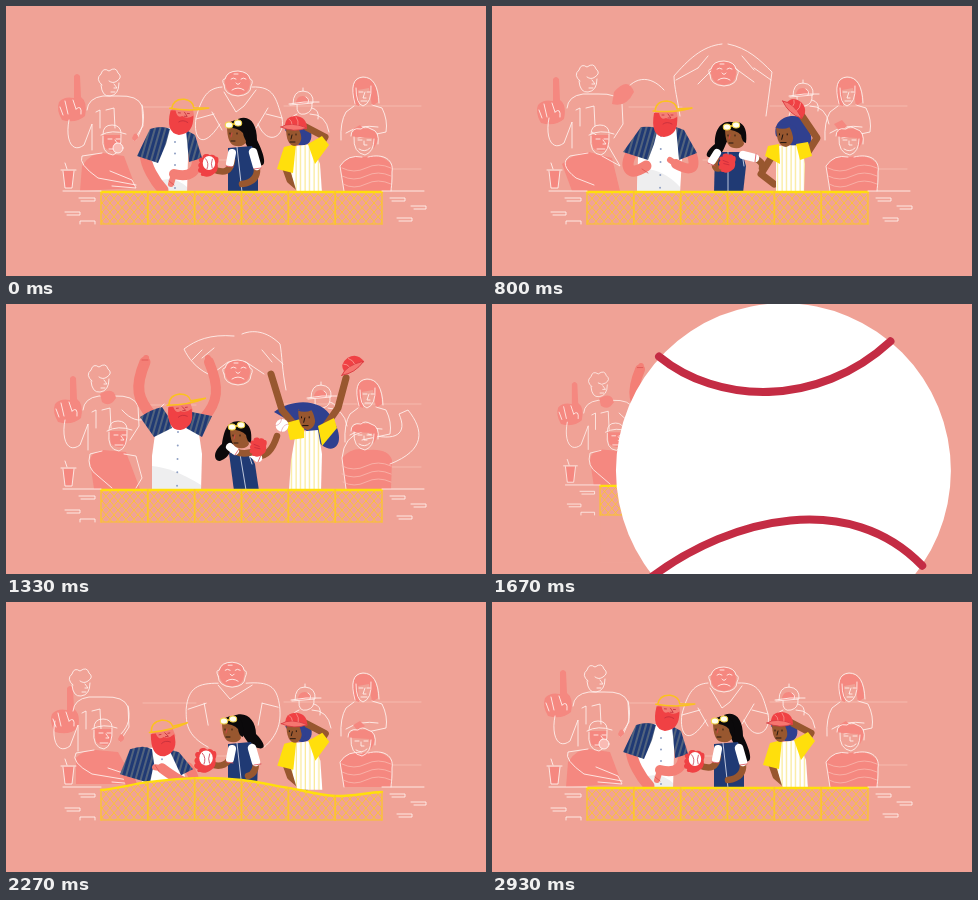
Recreate the animation shown at these times as an HTML page. Size 480 px wide and 270 px high, loop 2990 ms.

```html
<!DOCTYPE html>
<html lang="en">
<head>
<meta charset="utf-8">
<title>Ballpark catch</title>
<style>
html, body { margin: 0; width: 100%; height: 100%; overflow: hidden; background: #f0a296; }
svg { display: block; width: 100vw; height: 100vh; }
</style>
</head>
<body>
<svg id="stage" viewBox="0 0 480 270" stroke-linecap="round" stroke-linejoin="round">
  <defs>
    <pattern id="pin" width="5" height="5" patternUnits="userSpaceOnUse" patternTransform="rotate(16)">
      <path d="M0 0H5V5H0Z" fill="#203a74"/><path d="M2 0V5" stroke="#c9c394" stroke-width=".6"/>
    </pattern>
    <pattern id="stripe" width="4.5" height="5" patternUnits="userSpaceOnUse">
      <path d="M0 0H5V5H0Z" fill="#fff"/><path d="M2 0V5" stroke="#f5dc55" stroke-width=".8"/>
    </pattern>
    <clipPath id="fenceClip"><path id="clipShape"/></clipPath>
  </defs>
</svg>
<script>
const LOOP = 2990, STEP = 1000 / 15, FRAMES = 45;
const BG = '#f0a296', PINK = '#f58880', SKIN = '#f47f76', RED = '#f04144', NAVY = '#203a74',
  BROWN = '#98572f', BLACK = '#0b090b', YELLOW = '#ffdf0c', GOLD = '#fcc62d', BLUE = '#30408f', WHITE = '#fff';
const svg = document.getElementById('stage');
const NUM = /-?\d*\.?\d+/g;
const morphs = [];

const clamp = v => Math.max(0, Math.min(1, v));
const smooth = k => k * k * (3 - 2 * k);
const mix = (a, b, k) => {
  if (a === b) return a;
  const to = b.match(NUM);
  let i = 0;
  return a.replace(NUM, v => +(+v + (to[i++] - v) * k).toFixed(3));
};
function track(t, keys, ease = smooth) {
  let i = 0;
  while (i < keys.length - 2 && t >= keys[i + 1][0]) i++;
  const [t0, a] = keys[i], [t1, b] = keys[i + 1];
  return mix(a, b, ease(clamp((t - t0) / (t1 - t0))));
}

function add(parent, tag, attrs = {}) {
  const node = document.createElementNS('http://www.w3.org/2000/svg', tag);
  for (const name in attrs) node.setAttribute(name, attrs[name]);
  return parent.appendChild(node);
}
// poses: rest, look up, cheer, settle
function pose(node, attr, [rest, look = rest, cheer = look, settle = rest]) {
  node.setAttribute(attr, rest);
  if (look !== rest || cheer !== rest || settle !== rest)
    morphs.push({ node, attr, poses: [rest, look, cheer, settle] });
  return node;
}
const group = (parent, ...poses) => poses.length ? pose(add(parent, 'g'), 'transform', poses) : add(parent, 'g');
const fill = (parent, color, ...poses) => pose(add(parent, 'path', { fill: color }), 'd', poses);
const line = (parent, color, width, ...poses) =>
  pose(add(parent, 'path', { fill: 'none', stroke: color, 'stroke-width': width, pathLength: 1 }), 'd', poses);
const chalk = (parent, ...poses) => line(parent, '#fff4f0', .85, ...poses);
const oval = (parent, color, cx, cy, rx, ry = rx, extra = {}) =>
  add(parent, 'ellipse', { fill: color, cx, cy, rx, ry, ...extra });
const show = (node, on) => node.setAttribute('visibility', on ? 'visible' : 'hidden');

const world = group(svg);

// Seats and the chalk crowd
const seats = group(world);
line(seats, '#f8cbc0', .6, 'M137 101H190M278 100H415M385 163H415M211 154H222');

const mid = group(world);
chalk(mid, 'M216 81C202 82 196 90 190 112C187 132 196 146 214 118',
  'M188 110C186 96 182 80 182 70C196 54 210 40 230 38',
  'M202 70C190 64 182 54 178 45C190 36 204 30 228 32',
  'M210 80C190 80 180 84 178 106C178 120 178 132 200 144');
chalk(mid, 'M246 81C268 80 270 92 276 112C280 130 262 142 252 118',
  'M274 110C276 96 278 80 280 66C268 54 256 42 236 38',
  'M280 86C276 66 276 50 274 40C264 30 250 24 236 30',
  'M238 80C262 78 268 84 271 100C274 118 270 132 256 144');
chalk(mid, 'M218 86L230 106L238 100L250 84M206 106L216 124M262 102L250 122M190 113L208 108M276 112L260 108',
  'M206 78L224 60L240 60L262 76M206 62L216 50M262 64L250 50M184 74L206 62M279 74L262 62',
  'M206 70L222 58L240 58L258 70M196 54L208 44M266 58L256 46M186 56L196 46M277 60L266 50',
  'M210 82L222 96L228 92L244 82M196 100L200 122M254 100L250 122M180 106L198 100M270 104L254 100');
const midHead = group(mid, 'translate(231 78)', 'translate(231 68)', 'translate(231 69)', 'translate(223 72)');
fill(midHead, PINK, 'M-12 -3Q-10 -13 1 -13Q12 -12 13 -2Q13 10 1 11Q-12 10 -12 -3Z');
chalk(midHead, 'M-13 1Q-16 -5 -12 -5Q-10 -13 1 -13Q12 -12 13 -5Q17 -4 14 2Q14 11 1 12Q-13 11 -13 1M-6 -5Q-4 -7 -1 -5M4 -5Q6 -7 9 -5M-1 -1Q1 2 3 -1M-5 6Q1 2 7 6M-3 -10H1');

const finger = group(world, 'translate(0 0)', 'translate(-7 3)', 'translate(-4 4)', 'translate(-7 16)');
fill(finger, PINK, 'M68 92L68 70Q71 66 74 70L75 91Q82 96 79 110Q70 118 56 114Q50 104 53 96Q58 90 68 92Z');
chalk(finger, 'M59 95L62 108M67 94L70 103M54 101L57 109M70 103Q76 98 75 108');
const fan = group(world, 'translate(0 0)', 'translate(-6 -2)', 'translate(-4 2)', 'translate(-14 5)');
chalk(fan, 'M63 114C59 134 66 148 78 139L86 118V144M81 104Q82 92 97 90L112 90Q132 89 136 100L137 120L128 134M100 104L108 102L109 122M90 106L94 104V122');
chalk(fan, 'M136 99C139 112 138 120 130 134', 'M136 92C146 72 164 70 178 86', 'M120 104C138 124 150 110 162 98', 'M136 99C139 112 136 120 128 128');
const fanHead = group(fan, 'translate(103 76)', 'translate(101 74)', 'translate(97 72)', 'translate(88 75)');
chalk(fanHead, 'M-8 3Q-7 15 1 14Q10 13 10 1M-7 3Q-14 -3 -8 -8Q-6 -15 0 -11Q7 -16 9 -9Q14 -5 8 -1Q4 2 0 -1M5 2L8 6H5M2 10H6');
fill(fan, PINK, 'M128 128Q132 126 132 132Q128 138 126 132Z', 'M128 88Q142 72 148 88Q140 104 126 100Z', 'M98 88Q112 80 114 92Q108 102 100 96Z', 'M128 128Q132 126 132 132Q128 138 126 132Z');

const gum = group(world);
fill(gum, PINK, 'M74 185L76 160Q84 147 97 147L118 150L130 182Z', 'M80 185L70 158Q84 146 97 146L120 152L128 185Z', 'M88 185L84 158Q84 148 97 146L120 148L134 185Z', 'M70 182L70 156Q78 147 90 148L112 150L130 182Z');
chalk(gum, 'M96 147L76 150Q72 158 92 172L130 179M104 165L126 174L130 182L106 180',
  'M96 147L78 150Q66 158 84 172L102 179M110 150L128 160L114 136L100 126',
  'M96 147L84 150Q80 164 92 172L106 184M118 150L130 152L136 174L130 184',
  'M88 148L70 151Q64 160 86 172L128 179M102 166L126 174L130 182L106 180');
const gumHead = group(gum, 'translate(106 134)', 'translate(108 134)', 'translate(112 132)', 'translate(97 132)');
fill(gumHead, PINK, 'M-9 -5H9L8 9Q0 14 -7 8Z');
chalk(gumHead, 'M-9 -4Q-11 14 1 15Q10 12 9 -6M-11 -5Q0 -11 14 -6M-9 -6Q-9 -15 0 -15Q8 -15 9 -8M-4 -1H0M4 -1H8M3 0L6 4H3M-3 9H5');
const bubble = oval(gumHead, '#f9bab3', 6, 8, 5, 5, { stroke: WHITE, 'stroke-width': .8 });

const capFan = group(world, 'translate(0 0)', 'translate(14 -8)', 'translate(18 -4)', 'translate(2 0)');
fill(capFan, PINK, 'M290 98Q290 90 297 90Q304 91 304 98Z');
chalk(capFan, 'M287 98Q287 85 297 85Q308 86 307 97L284 99M283 98Q298 95 313 96M297 85V82M291 99Q290 110 299 108Q307 106 306 97M300 91Q304 93 302 97M306 102Q314 104 312 113M291 108Q282 111 283 122M304 108Q320 108 323 126');

const hairFan = group(world, 'translate(0 0)', 'translate(-2 0)', 'translate(4 4)', 'translate(0 0)');
fill(hairFan, PINK, 'M348 98Q343 72 357 72Q371 71 372 96L366 100L363 82L352 84L353 100Z');
chalk(hairFan, 'M350 82Q350 98 357 100Q366 97 365 80M353 86H357M361 86H364M359 86L357 92H360M355 95H361M348 100L340 106Q334 116 335 134M366 99L376 102Q382 114 380 126L352 132M340 127Q354 118 372 121M349 98Q342 72 357 71Q372 71 373 97');
fill(hairFan, PINK, 'M347 123L354 119L359 124L352 129Z', 'M344 118L352 114L357 120L350 126Z');

const stripeFan = group(world);
fill(stripeFan, PINK, 'M338 185L334 160Q342 148 358 151Q378 147 386 160L385 185Z', 'M338 185L334 160Q342 148 358 151Q378 147 386 160L385 185Z', 'M340 185L336 154Q346 142 362 146Q382 144 386 156L385 185Z');
chalk(stripeFan, 'M338 185L334 160Q342 148 356 151M362 151C378 147 388 154 386 166L386 172C386 178 385 182 385 185',
  'M338 185L334 160Q342 148 356 151M362 151C378 147 388 154 386 166L386 172C386 178 385 182 385 185',
  'M340 185L336 154Q338 132 356 128M362 130C390 138 402 130 393 110L402 106C418 126 420 146 384 160');
line(stripeFan, '#fac0b6', .7, 'M336 162Q348 168 360 162T385 162M336 170Q348 176 360 170T385 170M337 178Q348 184 360 178T385 178');
const stripeHead = group(stripeFan, 'translate(357 134)', 'translate(356 134)', 'translate(357 131)', 'translate(354 139)');
fill(stripeHead, PINK, 'M-12 -4Q-10 -12 0 -11Q14 -14 15 0L11 8L9 -2L-8 -3Z');
chalk(stripeHead, 'M-9 -3Q-10 13 2 15Q11 12 11 -1M-12 -4Q-12 -13 -2 -11Q2 -15 8 -11Q17 -9 15 4M-5 0H-1M4 0H8M1 1V5H4M-4 9Q2 13 7 8');

const cup = group(world);
fill(cup, PINK, 'M57 165H68L66 182H59Z');
chalk(cup, 'M55 164H70M57 165L59 182H66L68 165M61 163L59 157');

// Bearded man
const man = group(world);
fill(man, WHITE, 'M148 124Q165 120 182 124L182 152L181 187L160 187L141 160Z',
  'M149 123Q168 119 186 123L190 152L188 187L145 187L146 152Z',
  'M150 123Q172 118 192 123L196 150L195 187L146 187L146 152Z',
  'M134 124Q150 120 166 125L178 147L188 194L152 194L135 154Z');
fill(man, '#eeeeef', 'M160 187L152 176Q166 168 181 181V187Z', 'M145 187L146 164Q168 160 188 181V187Z', 'M146 187L146 162Q168 164 195 181V187Z', 'M152 194L146 178Q164 172 186 186V194Z');
line(man, '#8fa0c4', 2, 'M169 136L169 184', 'M169 130L168 184', 'M172 128L171 184', 'M156 134L172 184').setAttribute('stroke-dasharray', '0 .24');
line(man, SKIN, 11, 'M139 148C140 160 148 174 157 184', 'M140 146C132 160 136 172 154 160', 'M146 112C132 96 128 84 139 58', 'M122 146C124 164 136 180 150 188');
line(man, SKIN, 10, 'M190 147C194 166 184 172 168 168', 'M199 146C206 164 198 166 184 158', 'M198 114C212 98 214 84 203 58', 'M182 142C196 162 184 164 156 143');
fill(man, 'url(#pin)', 'M144 123Q156 119 164 123L160 138L152 157L131 150Z', 'M149 121Q158 120 166 122L162 138L156 154L131 146Z', 'M134 113Q146 105 156 103L162 112L166 124L148 133Z', 'M124 124Q138 119 146 124L148 138L144 158L114 149Z');
fill(man, 'url(#pin)', 'M180 124L189 129L196 152L183 156Z', 'M184 121L192 124L205 147L187 154Z', 'M186 108L206 112L196 133L180 124Z', 'M163 124L173 127L187 144L175 150Z');
line(man, SKIN, 6, 'M168 168L165 178', 'M154 160L149 165', 'M139 58L140 54', 'M156 143L149 142');
line(man, SKIN, 6, 'M155 184L159 186', 'M184 158L178 154', 'M203 58L202 54', 'M149 187L153 189');
line(man, '#d94c4c', .7, 'M163 175L168 179', 'M150 163L156 167', 'M136 56L142 56', 'M149 140L153 146');
const manHead = group(man, 'translate(175 113) rotate(4)', 'translate(173 115) rotate(0)', 'translate(174 110) rotate(-6)', 'translate(157 115) rotate(-10)');
fill(manHead, SKIN, 'M-10 -12H11L13 -3L11 4H-10Z');
fill(manHead, RED, 'M-11 -8Q-15 15 -1 16Q14 14 12 -4Q6 0 1 -3Q-4 0 -6 -8Z');
line(manHead, '#c32f3b', .8, 'M-2 3Q2 0 7 3M-3 -6H-1M6 -6H8M3 -7L6 -3H3');
add(manHead, 'path', { d: 'M-10 -10Q-9 -20 2 -20Q11 -19 12 -12L27 -13Q10 -8 -12 -10Z', fill: BG, stroke: '#fbc21e', 'stroke-width': 1.5 });

// Woman with the cap
const woman = group(world);
fill(woman, BLUE, 'M279 124C284 114 301 116 305 126C307 136 301 142 290 138Z',
  'M284 130C278 106 318 102 318 126C324 144 308 144 296 138Z',
  'M268 108C286 94 316 94 326 114C344 142 324 158 306 130Z');
line(woman, BROWN, 7, 'M279 160L284 174L298 186', 'M279 152L269 168L282 178', 'M291 124L276 106L265 70');
const raisedArm = line(woman, BROWN, 7, 'M312 142L319 131L298 120', 'M316 146L325 132L308 107', 'M318 124L332 104L340 74');
fill(woman, 'url(#stripe)', 'M284 141L306 138L314 158L316 187L291 187L283 160Z', 'M284 140L310 139L313 158L312 187L284 187L284 160Z', 'M290 128L312 126L316 150L315 187L283 187L285 156Z');
fill(woman, YELLOW, 'M278 141L290 138L287 167L271 163Z', 'M276 140L287 138L288 158L273 150Z', 'M280 119L298 114L298 134L284 136Z');
fill(woman, YELLOW, 'M302 138L316 130L323 139L309 158Z', 'M304 138L316 136L320 150L308 154Z', 'M312 122L328 114L331 124L316 142Z');
const womanHead = group(woman, 'translate(288 130) scale(1)', 'translate(293 130) scale(1.1)', 'translate(301 115) scale(1.1)');
fill(womanHead, BROWN, 'M-8 -9H7Q10 8 1 10Q-8 10 -8 -9Z');
line(womanHead, BLACK, .8, 'M-5 -2V-1M2 -2V-1M-2 -1L-3 3M-4 6H1');
fill(womanHead, BLUE, 'M-9 -8Q0 -14 10 -8Q13 6 8 6Q7 -4 4 -8Q-2 -5 -9 -8Z');
const cap = group(woman, 'translate(289 117) rotate(0)', 'translate(304 101) rotate(40)', 'translate(345 60) rotate(-35)');
fill(cap, RED, 'M-10 3Q-10 -7 1 -7Q12 -6 12 6Z');
add(cap, 'path', { d: 'M-14 4Q-5 -2 12 5Q-2 10 -14 4Z', fill: '#f67670', stroke: '#d93940', 'stroke-width': .8 });
line(cap, '#ffb3a8', .6, 'M1 -6Q4 -2 3 2M-6 -4Q-3 -2 -3 1');

// Girl with the glove
const MITT = 'M-33 -6C-46 -22 -30 -30 -22 -26C-26 -44 0 -46 8 -36C20 -42 30 -34 32 -30C46 -34 46 -12 40 0C44 20 36 36 26 40C10 54 -8 56 -18 50C-30 52 -32 44 -28 38C-42 38 -46 22 -36 16C-44 8 -40 -2 -33 -6Z';
function goggles(parent, x1, y1, x2, y2, r) {
  line(parent, GOLD, r * .4, `M${x1} ${y1}L${x2} ${y2}`);
  for (const [x, y] of [[x1, y1], [x2, y2]])
    oval(parent, '#fffdf0', x, y, r * 1.1, r * .9, { stroke: '#f3d544', 'stroke-width': r * .3 });
}
const girl = group(world);
fill(girl, BLACK, 'M232 113C244 108 251 118 251 134C258 148 262 162 253 159C247 152 243 144 238 134Z',
  'M246 118C230 110 222 124 223 138C213 146 210 154 226 151C232 146 232 140 238 130Z',
  'M240 119C222 112 218 126 216 140C204 150 210 160 216 156C226 152 224 142 232 134Z',
  'M227 114C240 108 250 118 250 132C260 142 260 148 252 146C243 144 242 140 236 132Z');
fill(girl, NAVY, 'M222 142L246 140L252 160L252 187L222 187Z', 'M223 146L250 146L254 160L251 187L222 187Z', 'M223 149L242 146L249 160L253 187L228 187Z', 'M222 142L245 140L252 160L251 187L222 187Z');
line(girl, '#e6eaf5', .8, 'M231 141L236 186M246 142L250 160', 'M236 146L236 186M250 147L252 160', 'M234 150L240 186M242 148L246 160');
line(girl, BROWN, 6.5, 'M251 162Q252 176 236 178', 'M262 152Q272 156 270 162', 'M250 152Q264 154 271 132', 'M250 160Q250 172 242 174');
line(girl, WHITE, 8.5, 'M247 146L251 160', 'M251 149L263 152', 'M247 150L252 154', 'M246 146L250 160');
line(girl, BROWN, 6.5, 'M226 154Q224 171 207 163', 'M224 152Q219 168 234 160', 'M224 143Q234 154 252 146', 'M225 152Q222 168 203 162');
line(girl, WHITE, 8, 'M226 147L224 157', 'M225 147L220 155', 'M224 143L229 147');
line(girl, '#d94a55', .8, 'M220 160L227 161M248 163L255 162', 'M216 157L223 160M264 148L263 156', 'M229 151L233 145M252 158L255 151');
const girlHead = group(girl, 'translate(230 130)', 'translate(242 132)', 'translate(233 134)', 'translate(225 130)');
fill(girlHead, BROWN, 'M-9 -10H7L10 6Q8 11 0 10Q-9 9 -9 -10Z');
fill(girlHead, BLACK, 'M-10 -9Q-6 -17 4 -16Q14 -13 12 5Q8 4 7 -3Q3 -8 -10 -9Z');
line(girlHead, BLACK, .8, 'M-6 -3V-2M1 -3V-2M-5 5H-1');
line(girlHead, '#d9454a', .8, 'M-4 -3L-5 1');
goggles(girlHead, -7, -11, 2, -13, 3.4);
const mitt = group(girl, 'translate(202 158) scale(.24)', 'translate(235 156) scale(.2)', 'translate(252 142) scale(.2)', 'translate(199 157) scale(.26)');
fill(mitt, RED, MITT);
line(mitt, '#b92338', 3, 'M-20 -8L6 2M-16 8L10 14');
const heldBall = group(mitt);
oval(heldBall, WHITE, 4, -4, 26, 29);
line(heldBall, '#c42c44', 3, 'M-10 -22Q6 -4 -4 20M18 -20Q10 0 17 16');

// The leap
const leap = group(world);
line(leap, BROWN, 22, 'M148 104L190 140');
line(leap, BROWN, 9, 'M255 148L262 164');
fill(leap, BLACK, 'M178 108C180 84 218 84 228 96C240 114 262 128 259 144C250 150 240 140 230 136Z');
fill(leap, WHITE, 'M182 121L172 138L200 160L204 142Z');
fill(leap, WHITE, 'M234 142Q252 138 260 151L244 165Z');
line(leap, '#d94a55', 1.2, 'M186 125L176 139M259 155L246 164');
fill(leap, NAVY, 'M195 148Q220 140 236 143L252 166L244 186H213Q200 174 195 148Z');
line(leap, '#dfe5f2', .9, 'M213 151L225 182M217 150L229 180');
fill(leap, BROWN, 'M183 118Q200 106 226 104Q232 112 234 119Q242 119 239 128Q234 130 231 127Q230 150 212 154Q196 154 190 138Z');
fill(leap, BLACK, 'M178 112Q186 92 210 95Q228 96 232 118Q222 108 184 118Z');
line(leap, BLACK, 2, 'M192 125V126M218 124V125');
line(leap, BLACK, 1.1, 'M204 139Q210 136 215 140M188 120L194 119M214 118L221 119');
line(leap, '#d9454a', 1.2, 'M204 122L202 133L206 134');
goggles(leap, 189, 108, 213, 106, 9.5);
add(leap, 'path', { d: MITT, fill: RED, transform: 'translate(115 79)' });

// Fence and walls
const cover = fill(world, BG, 'M0 0');
const mesh = add(world, 'g', { 'clip-path': 'url(#fenceClip)' });
const hatch = slope => {
  let d = '';
  for (let x = 20; x < 460; x += 8) d += `M${x} 220L${x + slope} 160`;
  return d;
};
line(mesh, GOLD, .9, hatch(52));
const crossHatch = line(mesh, GOLD, .9, hatch(-52));
const rail = line(world, YELLOW, 2.4, 'M0 0');
const posts = Array.from({ length: 7 }, (_, i) => line(world, GOLD, i % 6 ? 1.8 : 1.3, 'M0 0'));
const baseRail = line(world, GOLD, 1.2, 'M95 218H376');
const walls = group(world);
chalk(walls, 'M57 185H95M376 185H418M73 192H89V195H75M59 206H74V209H61M74 218V215H89V218M384 192H399V195H386M405 200H420V203H408M391 212H406V215H393');

// Ball in units of its radius
const ball = group(svg);
oval(ball, WHITE, 0, 0, 1);
line(ball, '#c42c44', .048, 'M-.744 -.68C-.4 -.4 .2 -.37 .637 -.774M-.79 .64C-.3 .27 .4 .12 .83 .565');

const POSES = [[0, 0], [250, 0], [720, 1], [900, 1], [1220, 2], [1700, 2], [1701, 3], [2550, 3], [2930, 0]];
const FLAT = '186 186 186 186 186 186 186';
const RAIL = [[0, FLAT], [1700, FLAT], [1701, '218 205 190 173 163 162 174'], [2000, '218 205 190 174 162 162 174'],
  [2250, '188 180 176 178 186 194 190'], [2530, '192 196 191 180 177 186 192'],
  [2730, '185 183 185 188 189 187 185'], [2930, FLAT]];
const BALL = [[1200, '262 60 1 -60'], [1330, '276 121 6 -45'], [1530, '280 140 32 -20'], [1600, '285 155 82 -10'],
  [1666, '292 167 168 0'], [1735, '232 136 112 14'], [1800, '166 103 66 28'], [1870, '124 84 40 36'],
  [2000, '115 79 30 41'], [2200, '187 110 13.5 60']];
const LEAP_END = [[2000, 'translate(0 0) scale(1)'], [2200, 'translate(135 75) scale(.45)']];

function drawFence(t, away) {
  const y = track(t, RAIL).split(' ').map(Number);
  const x = i => 95 + i * 281 / 6;
  const at = i => y[Math.max(0, Math.min(6, i))];
  let d = `M376 ${y[6]}`;
  for (let i = 6; i > 0; i--)
    d += `C${x(i) - 15.6} ${at(i) + (at(i - 1) - at(i + 1)) / 6} ${x(i - 1) + 15.6} ${at(i - 1) - (at(i - 2) - at(i)) / 6} ${x(i - 1)} ${y[i - 1]}`;
  rail.setAttribute('d', d);
  cover.setAttribute('d', d + 'V270H376Z');
  document.getElementById('clipShape').setAttribute('d', d + 'V218H376Z');
  posts.forEach((post, i) => {
    post.setAttribute('d', `M${x(i)} ${y[i]}V${i === 5 && away ? 204 : 218}`);
    show(post, !away || i === 5);
  });
  rail.setAttribute('stroke-dasharray', away ? '.62 2' : 'none');
  show(crossHatch, !away);
  baseRail.setAttribute('stroke', away ? WHITE : GOLD);
  baseRail.setAttribute('d', away ? 'M217 218H255' : 'M95 218H376');
}

function reveal(node, t, start, end) {
  const p = t < 1710 ? 1 : clamp((t - start) / (end - start));
  show(node, p > 0);
  node.setAttribute('stroke-dasharray', p < 1 ? `${p} 2` : 'none');
  node.setAttribute('opacity', Math.min(1, p * 1.5));
}

function draw(t) {
  const away = t > 1710 && t < 2190;
  let i = 0;
  while (i < POSES.length - 2 && t >= POSES[i + 1][0]) i++;
  const [t0, a] = POSES[i], [t1, b] = POSES[i + 1];
  const k = smooth(clamp((t - t0) / (t1 - t0)));
  for (const m of morphs) m.node.setAttribute(m.attr, mix(m.poses[a], m.poses[b], k));

  const zoom = t < 1710 ? 1 - .09 * smooth(clamp((t - 1470) / 190)) : 1;
  world.setAttribute('transform', `translate(${240 * (1 - zoom)} ${140 * (1 - zoom)}) scale(${zoom})`);

  for (const node of [mid, hairFan]) reveal(node, t, 1850, 1990);
  for (const node of [fan, finger, gum, capFan, stripeFan, cup, walls, seats]) reveal(node, t, 2060, 2280);
  const back = t > 1710 ? 1 - smooth(clamp((t - 2010) / 300)) : 0;
  mid.setAttribute('transform', `translate(${38 * back} ${21 * back})`);
  woman.setAttribute('transform', `translate(${6 * back} ${12 * back})`);
  show(raisedArm, !away);
  show(man, !away);
  show(girl, !away);
  const rise = t > 1710 ? 50 * (1 - smooth(clamp((t - 2120) / 280))) : 0;
  man.setAttribute('transform', `translate(0 ${rise})`);
  show(heldBall, !away && (t < 430 || t > 2190));

  const puff = 5 * clamp(t < 1700 ? (520 - t) / 300 : (t - 2620) / 260);
  bubble.setAttribute('rx', puff);
  bubble.setAttribute('ry', puff);
  show(bubble, puff > .2);

  drawFence(t, away);

  const [x, y, r, turn] = track(t, BALL, t > 2000 ? smooth : v => v).split(' ').map(Number);
  show(ball, t >= 1200 && t < 2190);
  ball.setAttribute('transform', `translate(${x} ${y}) rotate(${turn}) scale(${r})`);
  show(leap, away);
  const s = Math.min(1.4, r / 30);
  leap.setAttribute('transform', t > 2000 ? track(t, LEAP_END)
    : `translate(${x - 115 * s} ${y - 79 * s}) scale(${s})`);
}

const start = performance.now();
function tick() {
  const t = (performance.now() - start) % LOOP;
  draw(Math.floor(t / LOOP * FRAMES) * STEP);
  requestAnimationFrame(tick);
}
tick();
</script>
</body>
</html>
```
